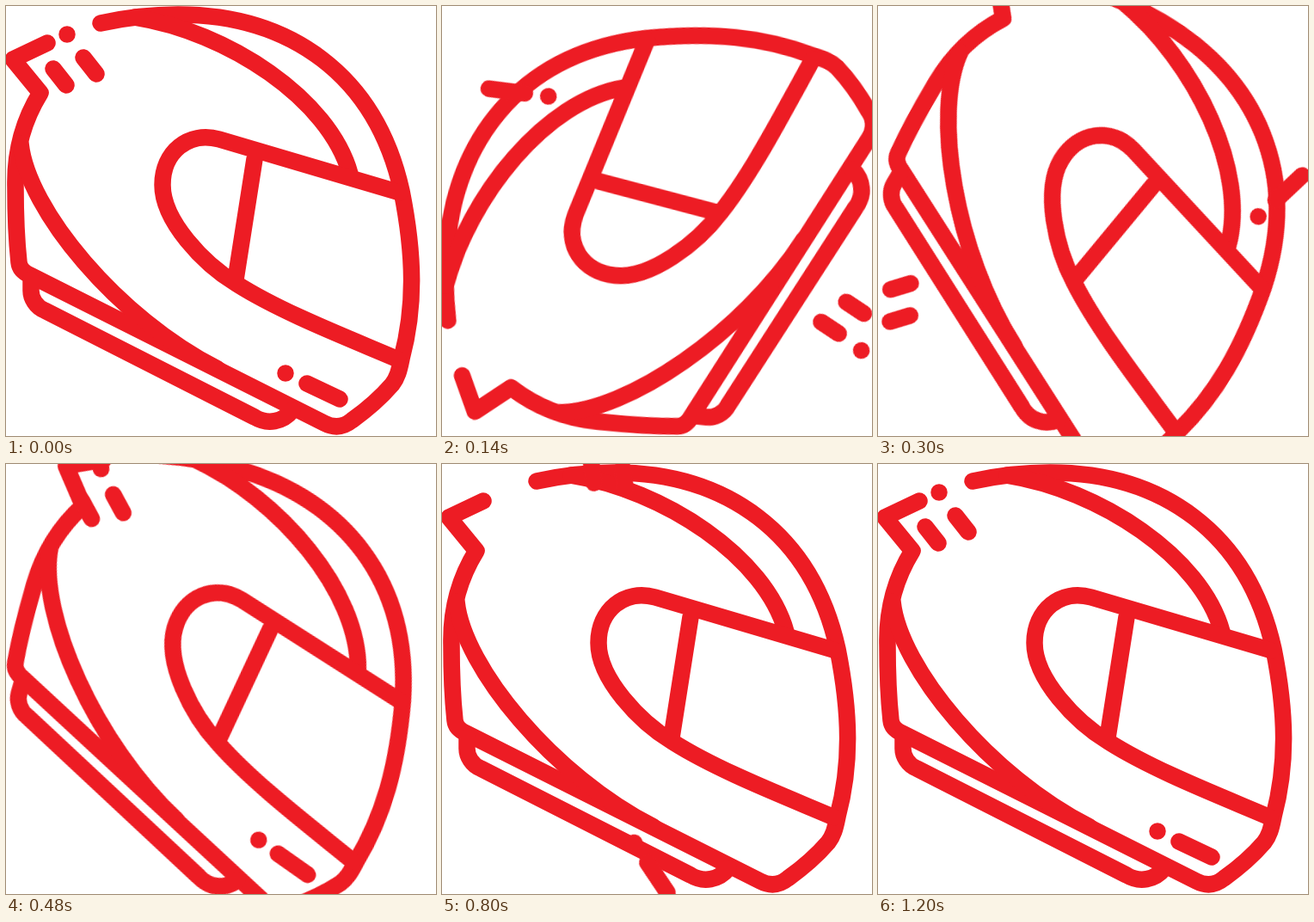
Animation of 500x500 px, one loop 1700 ms. Source, as an HTML page without scripts:

```html
<!DOCTYPE html>
<html lang="en">
<head>
<meta charset="utf-8">
<title>Spinning helmet</title>
<style>
  html, body { margin: 0; width: 100%; height: 100%; overflow: hidden; background: #fff; }
  svg { display: block; width: 100%; height: 100%; }
  g {
    fill: none; stroke: #ed1c24; stroke-width: 19.5;
    stroke-linecap: round; stroke-linejoin: round;
    transform-origin: 250px 250px;
    animation: 1.7s cubic-bezier(.34, 1.56, .64, 1) 5ms infinite;
  }
  .helmet { animation-name: spin-fast; }
  .details { animation-name: spin-slow; }

  /* One full turn in 600 ms and 1200 ms, then rest */
  @keyframes spin-fast {
    0% { transform: rotate(0deg); }
    35.294%, 100% { transform: rotate(360deg); }
  }
  @keyframes spin-slow {
    0% { transform: rotate(0deg); }
    70.588%, 100% { transform: rotate(360deg); }
  }
</style>
</head>
<body>
<svg viewBox="0 0 500 500">
  <g class="helmet">
    <!-- shell -->
    <path d="M110 20Q155 10 200 10C330 10 430 80 460 215C475 290 476 350 460 410C457 425 455 432 449 440Q430 462 402 482Q387 494 370 485L28 313Q16 308 15 298C12 270 11 235 11 210C10 165 22 130 40 101L8 62L48 43"/>
    <!-- crown and cheek seams -->
    <path d="M150 13C258 30 376 108 400 195M17 160C25 237 130 363 246 422"/>
    <!-- visor -->
    <path d="M458 217L248 155C212 145 182 170 182 208C182 250 230 300 268 323C320 356 395 385 456 411M289 178L267 318"/>
    <!-- neck rim -->
    <path d="M29 318V331C29 340 35 350 45 354L289 478C304 487 322 484 333 470"/>
  </g>
  <g class="details">
    <path d="M71 33h0M90 60l15 19M55 73l15 19M325 427h0M350 439l38 18"/>
  </g>
</svg>
</body>
</html>
```
